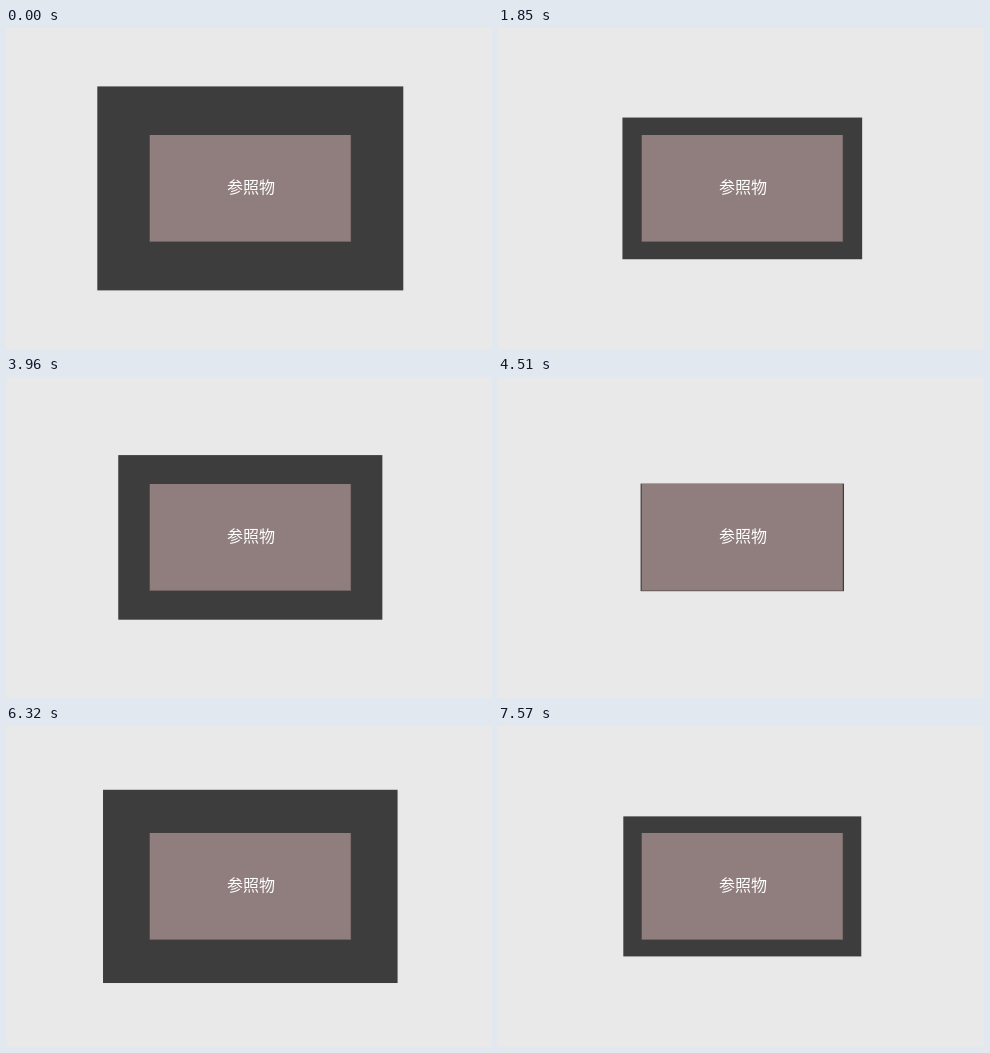
An HTML page for the animation above (7.67 s loop, 486x321 px).

```html
<!DOCTYPE html>
<html lang="zh-CN">
<head>
<meta charset="utf-8">
<title>参照物</title>
<style>
  html, body { margin: 0; width: 100%; height: 100%; overflow: hidden; background: #e9e9e9; }
  svg { display: block; width: 486px; height: 321px; }
  text { font: 500 16px "Noto Sans CJK SC", "Noto Sans CJK", sans-serif; fill: #fff; text-anchor: middle; }
</style>
</head>
<body>
<svg viewBox="0 0 486 321">
  <rect id="box" fill="#3d3d3d"/>
  <rect x="143.7" y="107" width="201.3" height="106.8" fill="#907e7e"/>
  <path d="M344.7 107V213.5H143.7" fill="none" stroke="#665d5a" stroke-width=".6"/>
  <text x="245" y="165">参照物</text>
</svg>
<script>
  const LOOP = 7670, PERIOD = 2922, PHASE = 20;
  const CENTER = { x: 244.3, y: 160.4 };
  const box = document.getElementById('box');

  // Pose changes: [end time, number of even steps leading up to it]
  const segments = [[1060, 8], [2150, 8], [3270, 8], [4380, 8], [5450, 8], [7020, 11], [7570, 4], [LOOP, 1]];

  function stepTime(t) {
    let start = 0;
    for (const [end, count] of segments) {
      if (t < end) {
        const step = (end - start) / count;
        return start + Math.floor((t - start) / step) * step;
      }
      start = end;
    }
    return 0;
  }

  // Parabolic bounce: largest at the apex, shrinking to the inner panel
  function pose(t) {
    const u = (t + PHASE) / PERIOD % 1;
    const fall = (1 - Math.abs(2 * u - 1)) ** 2;
    const w = 306 - 105 * fall;
    const h = 204 - 98.7 * fall;
    box.setAttribute('x', CENTER.x - w / 2);
    box.setAttribute('y', CENTER.y - h / 2);
    box.setAttribute('width', w);
    box.setAttribute('height', h);
  }

  const began = performance.now();
  function tick() {
    pose(stepTime((performance.now() - began) % LOOP));
    requestAnimationFrame(tick);
  }
  tick();
</script>
</body>
</html>
```
